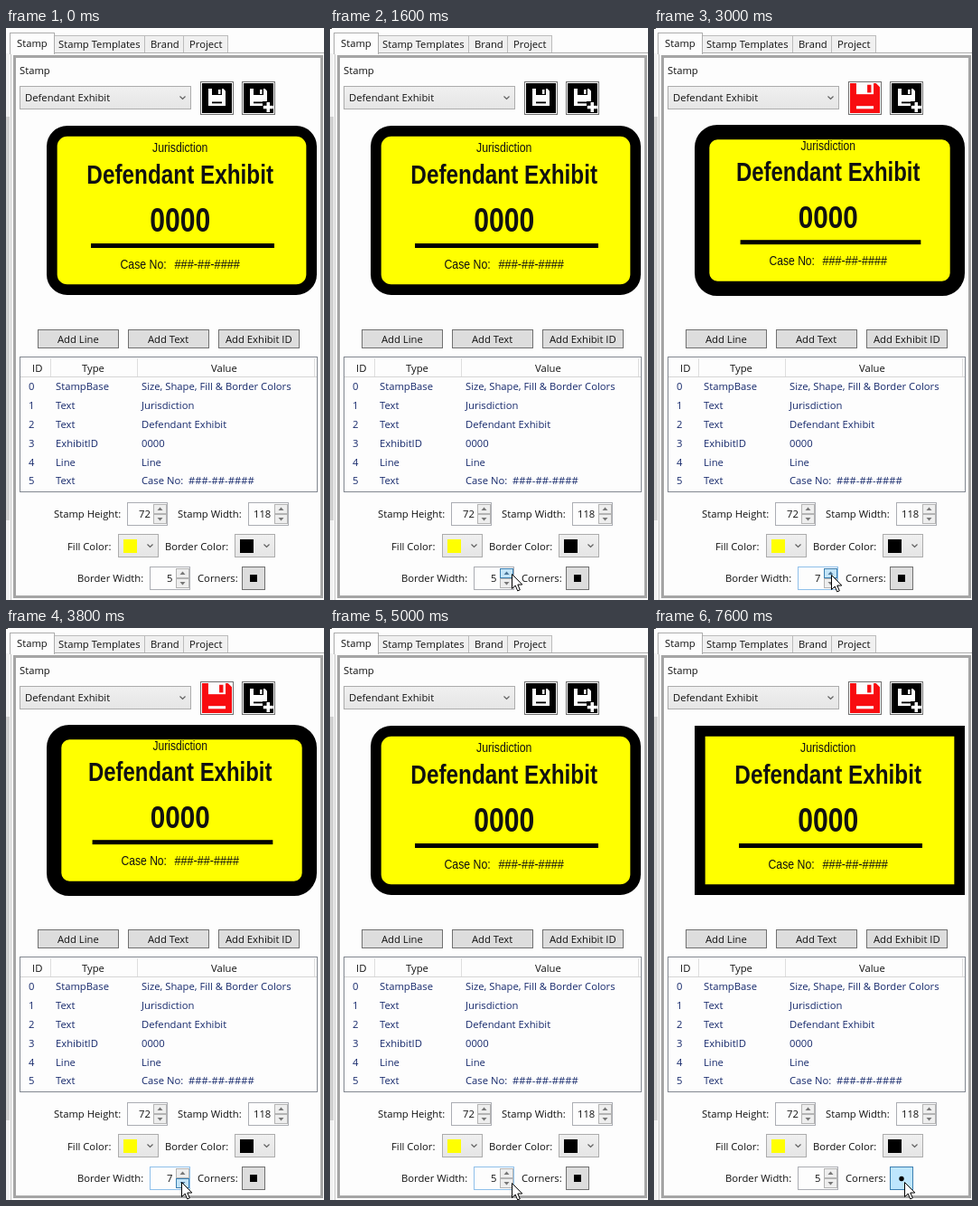
Animation of 352x632 px, one loop 8 s. Source, as an HTML page with a canvas:

```html
<!DOCTYPE html>
<html lang="en">
<head>
<meta charset="utf-8">
<title>Stamp editor</title>
<style>
  html, body { margin: 0; width: 100%; height: 100%; overflow: hidden; background: #fdfdfd; }
  canvas { display: block; width: 352px; height: 632px; }
</style>
</head>
<body>
<canvas id="stage" width="352" height="632"></canvas>
<script>
const ctx = document.getElementById('stage').getContext('2d');
const LOOP = 8000, STEP = 200;
const UI = '"Open Sans", "Noto Sans", sans-serif';
const PAPER = '#fdfdfd', NAVY = '#15286b', RED = '#f80c10';
const NARROW = 0.83; // condensed face for the stamp lettering

// [time, x, y] of the pointer tip
const pointerPath = [
  [400, -12, 440], [800, 110, 545], [1200, 202, 603], [1600, 201, 603],
  [2400, 197, 604], [3000, 196, 604], [3600, 194, 611], [4200, 194, 613],
  [4800, 194, 613], [5000, 201, 613], [5600, 274, 611], [6600, 276, 611],
  [7400, 276, 611], [7600, 277, 612]
];
const borderSteps = [[0, 5], [2000, 6], [2600, 7], [4000, 6], [4600, 5]];
const cornerSteps = [[0, false], [5600, true], [6000, false], [6400, true]];

function valueAt(steps, t) {
  let v = steps[0][1];
  for (const [at, next] of steps) if (t >= at) v = next;
  return v;
}

function pointerAt(t) {
  if (t < pointerPath[0][0]) return null;
  for (let i = 1; i < pointerPath.length; i++) {
    const [t0, x0, y0] = pointerPath[i - 1], [t1, x1, y1] = pointerPath[i];
    if (t < t1) {
      const k = (t - t0) / (t1 - t0);
      return [x0 + (x1 - x0) * k, y0 + (y1 - y0) * k];
    }
  }
  return pointerPath[pointerPath.length - 1].slice(1);
}

function rect(x, y, w, h, fill) {
  ctx.fillStyle = fill;
  ctx.fillRect(x, y, w, h);
}

function box(x, y, w, h, fill, line) {
  rect(x, y, w, h, line);
  rect(x + 1, y + 1, w - 2, h - 2, fill);
}

function label(str, x, y, color = '#111') {
  ctx.font = '11.25px ' + UI;
  ctx.textAlign = 'left';
  ctx.fillStyle = color;
  ctx.fillText(str, x, y);
}

function poly(points, fill, line, width = 1) {
  ctx.beginPath();
  points.forEach(([x, y]) => ctx.lineTo(x, y));
  if (fill) {
    ctx.closePath();
    ctx.fillStyle = fill;
    ctx.fill();
  }
  if (line) {
    ctx.strokeStyle = line;
    ctx.lineWidth = width;
    ctx.stroke();
  }
}

function chevron(x, y) {
  poly([[x - 3, y - 1.5], [x, y + 1.5], [x + 3, y - 1.5]], null, '#606060', 1.2);
}

function combo(x, y, w, h) {
  const g = ctx.createLinearGradient(0, y, 0, y + h);
  g.addColorStop(0, '#f0f0f0');
  g.addColorStop(1, '#e5e5e5');
  box(x, y, w, h, g, '#acacac');
  chevron(x + w - 9.5, y + h / 2);
}

function button(str, x, textX) {
  box(x, 333, 90, 21, '#ddd', '#707070');
  label(str, textX, 348);
}

function spinner(x, y, value, hover, focus) {
  box(x, y, 45, 26, PAPER, focus ? '#8fc0ea' : '#abadb3');
  label(value, x + 26 - Math.round(value.length * 6.5), y + 17);
  ['up', 'down'].forEach((dir, i) => {
    const by = y + 2 + i * 11, on = hover === dir, s = i ? 1 : -1;
    box(x + 29, by, 15, 11, on ? '#c4e5f8' : '#eee', on ? '#3c7fb1' : '#b4b4b4');
    const cx = x + 36.5, cy = by + 5.5;
    poly([[cx - 3, cy - 1.5 * s], [cx + 3, cy - 1.5 * s], [cx, cy + 2 * s]], on ? '#4a7597' : '#777');
  });
}

function tabs() {
  [['Stamp Templates', 53, 101, 58], ['Brand', 153, 44, 160], ['Project', 196, 50, 203]].forEach(([str, x, w, textX]) => {
    box(x, 8, w, 20, '#f0f0f0', '#bcbcbc');
    label(str, textX, 22);
  });
  rect(5, 27, 347, 1, '#acacac');
  rect(5, 27, 1, 605, '#c4c4c4');
  box(4, 5, 50, 24, PAPER, '#acacac');
  rect(5, 27, 48, 2, PAPER);
  label('Stamp', 12, 21);
}

function panel() {
  rect(0, 28, 4, 604, '#f2f2f2');
  rect(0, 98, 4, 446, '#d0d0d0');
  tabs();
  ctx.strokeStyle = '#a5a5a5';
  ctx.lineWidth = 3;
  ctx.strokeRect(9.5, 31.5, 340, 597);
  label('Stamp', 15, 51);
  combo(15, 64, 190, 26);
  label('Defendant Exhibit', 21, 81);
}

function floppy(x, y, size, body, mark) {
  const u = size / 19;
  ctx.save();
  ctx.translate(x, y);
  ctx.scale(u, u);
  poly([[0, 0], [16.5, 0], [19, 2.5], [19, 19], [0, 19]], body);
  rect(4, 0, 11, 7, mark);
  rect(11, 1, 2.5, 5, body);
  rect(4, 14.5, 11, 1.8, mark);
  ctx.restore();
}

function iconButton(x, face) {
  box(x, 59, 37, 37, PAPER, '#707070');
  rect(x + 2, 61, 33, 33, face);
}

function saveIcons(changed) {
  if (changed) {
    iconButton(215, PAPER);
    floppy(217, 61, 33, RED, PAPER);
  } else {
    iconButton(215, '#000');
    floppy(224, 67, 19, PAPER, '#000');
  }
  iconButton(261, '#000');
  floppy(270, 67, 19, PAPER, '#000');
  rect(284, 81, 12, 13, '#000');
  rect(288.5, 82, 3.5, 11, PAPER);
  rect(284.8, 85.8, 11, 3.5, PAPER);
}

function stampText(str, x, y, size, weight = '') {
  ctx.save();
  ctx.translate(x, y);
  ctx.scale(NARROW, 1);
  ctx.font = `${weight} ${size}px "Liberation Sans", Arial, sans-serif`;
  ctx.fillText(str, 0, 0);
  ctx.restore();
}

function stamp(border, square) {
  const zoom = 123 / (118 + border);
  const shift = border === 6 ? 1 : 0; // pixel rounding of the preview
  const line = border * 2.33;
  const w = 299 + shift, h = 187 + (border - 5);
  const x = 45, y = 201.5 - h / 2 + shift;
  ctx.save();
  ctx.filter = 'blur(0.35px)';
  ctx.beginPath();
  ctx.roundRect(x + line / 2, y + line / 2, w - line, h - line, square ? 0 : 17);
  ctx.fillStyle = '#ff0';
  ctx.fill();
  ctx.lineWidth = line;
  ctx.strokeStyle = '#000';
  ctx.stroke();

  ctx.translate(193 + shift, 201.5 + shift - 1.6 * (border - 5));
  ctx.scale(zoom, zoom);
  ctx.translate(-193, -201.5);
  ctx.fillStyle = '#111';
  ctx.textAlign = 'center';
  stampText('Jurisdiction', 192.7, 137, 14.8);
  stampText('Defendant Exhibit', 192.7, 172, 29.3, 'bold');
  stampText('0000', 192.7, 224.5, 36.3, 'bold');
  ctx.textAlign = 'left';
  stampText('Case No:', 126.5, 266, 14.8);
  stampText('###-##-####', 186.5, 266, 15.4);
  rect(94, 238, 203, 5, '#000');
  ctx.restore();
}

function table() {
  box(15, 363, 330, 150, PAPER, '#828790');
  [49, 145, 341].forEach(x => rect(x, 365, 1, 20, '#dedede'));
  rect(16, 385, 328, 1, '#d5d5d5');
  label('ID', 29, 380);
  label('Type', 84, 380);
  label('Value', 227, 380);
  [
    ['StampBase', 'Size, Shape, Fill & Border Colors'],
    ['Text', 'Jurisdiction'],
    ['Text', 'Defendant Exhibit'],
    ['ExhibitID', '0000'],
    ['Line', 'Line'],
    ['Text', 'Case No:  ###-##-####']
  ].forEach(([type, value], i) => {
    const y = Math.round(400.4 + i * 20.8);
    label(i, 25, y, NAVY);
    label(type, 55, y, NAVY);
    label(value, 150, y, NAVY);
  });
}

function swatch(x, color) {
  combo(x, 559, 45, 26);
  rect(x + 6, 565, 15, 15, color);
}

function fields(t, border, square) {
  label('Stamp Height:', 53, 541);
  spinner(134, 524, '72');
  label('Stamp Width:', 190, 541);
  spinner(268, 524, '118');

  label('Fill Color:', 68, 577);
  swatch(124, '#ff0');
  label('Border Color:', 176, 577);
  swatch(253, '#000');

  const hover = t >= 1200 && t < 3400 ? 'up' : t >= 3400 && t < 5000 ? 'down' : '';
  label('Border Width:', 79, 612);
  spinner(159, 595, String(border), hover, t >= 1800 && t < 5400);
  if (t >= 4000 && t < 4400) rect(179, 601, 1, 13, '#000');

  const over = t >= 5600;
  label('Corners:', 212, 612);
  box(261, 595, 26, 26, over ? '#bee6fd' : '#ddd', over ? '#3c7fb1' : '#707070');
  if (square) {
    ctx.beginPath();
    ctx.arc(274, 608.5, 2.7, 0, Math.PI * 2);
    ctx.fillStyle = '#000';
    ctx.fill();
  } else {
    rect(270, 604, 8, 8, '#000');
  }
}

function pointer(x, y) {
  ctx.save();
  ctx.translate(Math.round(x) + 0.5, Math.round(y) + 0.5);
  poly([[0, 0], [0, 16], [3.7, 12.5], [6.2, 18.4], [8.8, 17.3], [6.3, 11.5], [11.3, 11.5], [0, 0]], '#fff', '#000');
  ctx.restore();
}

function draw(t) {
  const border = valueAt(borderSteps, t), square = valueAt(cornerSteps, t);
  rect(0, 0, 352, 632, PAPER);
  panel();
  saveIcons(border !== 5 || square);
  stamp(border, square);
  button('Add Line', 35, 57);
  button('Add Text', 135, 157);
  button('Add Exhibit ID', 235, 243);
  table();
  fields(t, border, square);
  if (t >= 1400) rect(0, 0, 2, 1, '#333');
  const at = pointerAt(t);
  if (at) pointer(...at);
}

const start = performance.now();
function frame() {
  const t = (performance.now() - start) % LOOP;
  draw(Math.floor(t / STEP) * STEP);
  requestAnimationFrame(frame);
}
frame();
</script>
</body>
</html>
```
